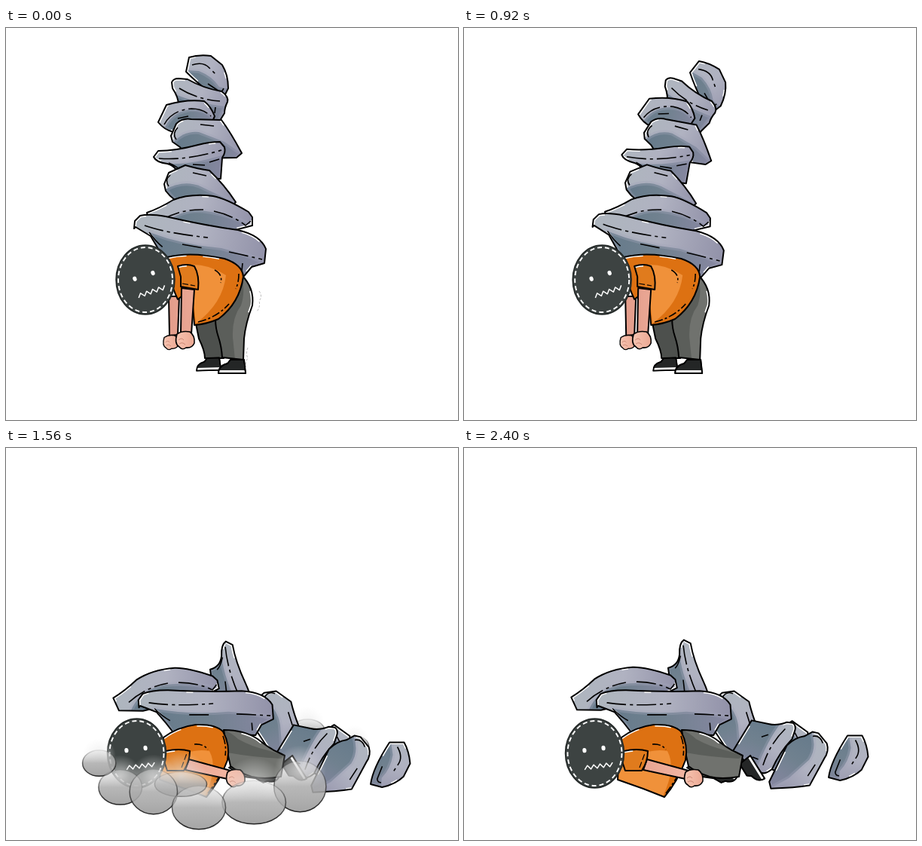
Animation of 600x520 px, one loop 2440 ms. Source, as an HTML page with a canvas:

```html
<!DOCTYPE html>
<html lang="en">
<head>
<meta charset="utf-8">
<title>Crushed by the load</title>
<style>
html, body { margin: 0; width: 100%; height: 100%; overflow: hidden; background: #fff; }
canvas { display: block; width: 600px; height: 520px; }
</style>
</head>
<body>
<canvas id="stage" width="600" height="520"></canvas>
<script>
const ctx = document.getElementById('stage').getContext('2d');
const LOOP = 2440, STEP = 40, TOPPLE = 1240, IMPACT = 1460;
const clamp = (v, lo = 0, hi = 1) => Math.min(hi, Math.max(lo, v));
const mix = (a, b, f) => a + (b - a) * f;
const span = (t, a, b) => clamp((t - a) / (b - a));
const rad = d => d * Math.PI / 180;

// Poses are [centre x, centre y, turn in degrees, scale].
// Outlines are drawn in the coordinates of the resting pose.
const rocks = [
  { rest: [267, 63, 0], left: [219, 65, -16], right: [323, 76, 26], fall: [387, 148, -15], down: [510, 410, 78], dip: 9, half: 44,
    edge: 'M239 58L243 39Q256 35 272 37L287 49Q295 62 295 80L288 94Q268 87 239 58Z',
    shade: 'M238 56L256 57Q274 64 283 78L295 81L288 96Q264 88 238 58Z',
    lines: 'M247 49Q262 44 270 53L279 62M268 74L283 84Q288 85 289 79' },
  { rest: [258, 91, 0], left: [221, 97, -8], right: [300, 97, 14], fall: [419, 240, 40], down: [409, 397, 104], dip: 6, half: 44,
    edge: 'M221 80L220 72Q222 67 229 67L241 68Q262 80 286 84Q296 91 294 98Q290 106 290 113L282 126L278 141L230 126L229 102Q229 92 221 80Z',
    shade: 'M225 88Q250 99 291 104L282 126L278 143L228 128Z',
    lines: 'M230 80Q254 95 284 97M243 100L248 108M278 105L277 113' },
  { rest: [239, 117, 0], left: [214, 124, -10], right: [269, 113, 10], fall: [411, 211, 44], down: [437, 400, 100], dip: 5, half: 44,
    edge: 'M202 125L213 102Q240 94 263 97Q272 104 277 117L274 124L268 147L236 148L222 138Q210 135 202 125Z',
    shade: 'M211 132Q222 109 248 108Q264 108 275 118L268 148L236 150Z',
    lines: 'M210 128Q220 109 246 107Q262 107 272 117M228 120L242 117' },
  { rest: [265, 146, 0], left: [249, 147, -6], right: [284, 149, 9], fall: [415, 298, 45], down: [447, 418, 117], dip: 5, half: 48,
    edge: 'M219 143L226 127Q234 119 246 121L286 122Q298 138 313 166L306 172L252 173Q238 168 231 158L221 151Z',
    shade: 'M222 152Q236 136 256 138L290 151L312 166L306 174L250 175Q234 168 222 152Z',
    lines: 'M226 148Q220 140 228 132M258 128L276 130' },
  { rest: [243, 172, 0], left: [233, 174, -5], right: [256, 174, 6], fall: [272, 204, 64, .86], down: [299, 301, 80], dip: 2, half: 46,
    edge: 'M196 171L202 163Q225 163 255 155Q270 151 284 151L290 158Q292 165 287 172L285 200L229 198Q228 184 214 180Q199 178 196 171Z',
    shade: 'M214 180Q246 182 289 168L285 201L229 199Q228 184 214 180Z',
    lines: 'M203 173Q240 176 286 162M216 179Q228 184 231 189M248 181L264 182M270 178L283 174' },
  { rest: [257, 206, 0], left: [253, 208, -3], right: [261, 206, 2], fall: [310, 268, 45], down: [367, 365, 60], dip: 0, half: 46,
    edge: 'M210 207L216 192L238 182Q255 187 270 189Q290 208 305 231L298 238L246 241Q222 230 212 216Z',
    shade: 'M212 214Q236 201 258 210L300 230L298 240L246 243Q222 230 212 214Z',
    lines: 'M216 210Q210 202 218 195M248 192L266 196' },
  { rest: [257, 246, 0], left: [257, 246, 0], right: [257, 246, 1], fall: [221, 260, 8], down: [211, 317, -12], dip: 1, half: 68,
    edge: 'M187 245Q204 239 222 228Q245 219 275 223Q292 226 322 244L327 251L327 262L304 268L222 270L191 263Z',
    shade: 'M206 267Q222 243 255 242Q290 244 326 262L304 270L222 272Z',
    lines: 'M206 255Q232 240 262 241M276 243Q300 248 318 262L325 256' },
  { rest: [256, 288, 0], left: [257, 288, -.7], right: [256, 288, 1.4], fall: [260, 307, 4], down: [265, 351, -10], dip: 0, half: 85,
    edge: 'M170 266L171 256L178 249Q190 246 212 250Q264 262 308 268Q338 275 345 293L343 312L326 317L316 329Q260 316 211 310Q202 292 192 276L172 264Z',
    shade: 'M190 271Q236 288 286 292Q326 302 343 311L326 318L316 331L209 311Q202 288 190 271Z',
    lines: 'M184 262Q212 272 268 278M190 271Q200 285 210 292M234 287L262 292M296 297Q324 303 340 307M314 312L313 322' }
];
for (const r of rocks)
  for (const key of ['edge', 'shade', 'lines']) r[key] = new Path2D(r[key]);

const swayTimes = [0, 200, 400, 600, 920, TOPPLE];

// Monotone cubic through the sway keys.
function spline(values, t) {
  const T = swayTimes;
  let i = 0;
  while (i < T.length - 2 && t > T[i + 1]) i++;
  const slope = k => (values[k + 1] - values[k]) / (T[k + 1] - T[k]);
  const tangent = k => {
    if (k === 0) return slope(0);
    if (k === T.length - 1) return slope(k - 1);
    const a = slope(k - 1), b = slope(k);
    return a * b <= 0 ? 0 : 2 * a * b / (a + b);
  };
  const h = T[i + 1] - T[i], u = (t - T[i]) / h, v = 1 - u;
  return (1 + 2 * u) * v * v * values[i] + u * v * v * h * tangent(i)
    + u * u * (3 - 2 * u) * values[i + 1] - u * u * v * h * tangent(i + 1);
}

function rockPose(r, t) {
  const keys = [r.rest, r.right, r.rest, r.left, r.right, r.fall];
  const value = (p, k) => p[k] ?? 1;
  return [0, 1, 2, 3].map(k => {
    if (t <= TOPPLE) return spline(keys.map(p => value(p, k)), t);
    const u = span(t, TOPPLE, IMPACT);
    const dip = k === 1 ? r.dip * u * (1 - span(t, 1560, 1720)) : 0;
    return mix(value(r.fall, k), value(r.down, k), u * (.6 + .4 * u)) + dip;
  });
}

function stroke(path, color = '#000', width = 2, dash = []) {
  ctx.strokeStyle = color;
  ctx.lineWidth = width;
  ctx.setLineDash(dash);
  ctx.stroke(path);
  ctx.setLineDash([]);
}

function fill(path, color) {
  ctx.fillStyle = color;
  ctx.fill(path);
}

function gradient(x0, y0, x1, y1, ...colors) {
  const g = ctx.createLinearGradient(x0, y0, x1, y1);
  colors.forEach((c, i) => g.addColorStop(i / (colors.length - 1), c));
  return g;
}

// Filled shape with broken white light just inside its black outline.
function inked(path, color, inner, dash = [16, 46, 7, 60]) {
  fill(path, color);
  ctx.save();
  ctx.clip(path);
  if (inner) inner();
  stroke(path, '#fff', 5, dash);
  ctx.restore();
  stroke(path);
}

function drawRock(r, t) {
  const [x, y, turn, scale] = rockPose(r, t);
  const [cx, cy] = r.rest;
  const w = r.half;
  ctx.save();
  ctx.translate(x, y);
  ctx.rotate(rad(turn));
  ctx.scale(scale, scale);
  ctx.translate(-cx, -cy);
  inked(r.edge, gradient(cx - w, cy - 20, cx + w, cy + 20, '#aeb6be', '#b0b2c1', '#9292a9'), () => {
    fill(r.shade, gradient(cx - w, cy, cx + w, cy + 10, '#64798a', '#70818f', '#8787a1'));
    ctx.globalAlpha = .35;
    stroke(r.shade, '#a2a4b8', 6);
    ctx.globalAlpha = 1;
  }, [28, 50, 9, 70]);
  stroke(r.lines, '#000', 1.6, [26, 5, 4, 5]);
  ctx.restore();
}

// Each part: standing, toppling, lying.
const man = {
  shirt: ['M214 304Q245 296 290 306Q314 314 315 330Q310 365 282 386Q266 393 250 394L246 346L228 360Q214 330 214 304Z',
    'M214 356Q228 331 272 333Q292 337 300 346Q302 368 288 400Q276 418 256 432L236 412L217 392Q212 372 214 356Z',
    'M209 384Q228 370 252 367Q278 366 288 376Q298 394 294 414Q284 442 266 463L238 452L204 440Q205 410 209 384Z'],
  glow: ['M228 316Q262 308 292 328Q288 365 252 392L247 346Z',
    'M216 372Q250 342 277 358Q276 395 256 431L218 392Z',
    'M206 425Q240 396 270 402Q282 424 264 462L205 440Z'],
  folds: ['M277 321Q288 327 285 338M309 326Q309 338 305 346M255 390Q280 384 296 366',
    'M266 356Q276 360 275 369M295 350Q297 364 293 376M260 426Q276 414 287 398',
    'M250 393Q262 392 268 400M288 382Q293 396 291 408M268 458Q280 442 290 424'],
  sleeve: ['M228 316Q240 312 250 316Q257 328 255 347L232 343L232 330Z',
    'M220 358Q238 354 254 364Q252 374 242 386L220 377L218 368Z',
    'M212 402Q230 398 244 402Q244 416 236 428L214 428L210 416Z'],
  cuff: ['M234 339L251 342', 'M238 381L249 366', 'M233 424L240 405'],
  arm: ['M233 345L250 347L246 406L232 404Z', 'M242 386L254 372L302 404L290 414Z', 'M238 427L243 413L298 428L294 439Z'],
  farArm: ['M216 356L230 356L228 407L217 408Z', 'M238 386L248 376L298 408L290 414Z', 'M234 426L240 416L298 430L294 437Z'],
  leg: ['M313 328Q330 345 327 368Q318 392 316 412L315 440L287 437Q286 422 282 410Q278 398 278 386L300 366Z',
    'M299 347Q324 350 336 368Q346 386 360 402L372 414L359 437Q338 432 328 424Q312 410 302 396L296 376Z',
    'M289 374Q316 374 334 386Q352 400 360 403L370 408L365 436Q342 440 326 436Q308 430 298 422L294 404Z'],
  legShade: ['M313 328Q318 350 312 368Q300 384 301 410L304 440L287 437Q284 410 277 386Z',
    'M299 347Q312 364 316 380Q330 402 344 418L366 428L359 437Q326 428 296 376Z',
    'M289 374Q300 378 308 386Q326 396 344 400L370 408L365 412Q326 410 294 404Z'],
  farLeg: ['M252 392L284 384Q286 400 287 415L289 438L264 438Q264 428 256 412Z',
    'M276 424L292 404Q304 420 310 426L328 430L320 442Q296 436 288 436Z',
    'M296 424L316 412Q330 426 338 428L352 432L346 440Q330 438 316 436Z']
};
const joints = {
  head: [[185, 334, -18], [179.5, 369.5, -14], [173.5, 405, -7]],
  hand: [[238, 414, 0], [302, 416, 0], [305, 438, 0]],
  farHand: [[219, 417, 0], [300, 413, 0], [304, 437, 0]],
  shoe: [[300, 449, 0], [371, 436, -76], [382, 428, -122]],
  farShoe: [[269, 446, -2], [327, 443, -80], [344, 436, -150]]
};
const handShape = new Path2D('M-11-8Q-4-13 6-11Q13-6 12 4Q9 11 1 10Q-4 14-8 9Q-15 5-11-8Z');
const knuckles = new Path2D('M-9 0Q-5-4-2 0M-8 5Q-4 2 0 6');
const shoeShape = new Path2D('M-18 9Q-18-1-6-4L-2-9L16-9L18 9Z');
const soleShape = new Path2D('M-18 5L18 5L18 9L-18 9Z');

function morph(poses, p) {
  const i = p < 1 ? 0 : 1, number = /-?[\d.]+/g;
  const next = poses[i + 1].match(number);
  let k = 0;
  return new Path2D(poses[i].replace(number, n => mix(+n, +next[k++], p - i).toFixed(2)));
}

function at(joint, p, draw, scale = 1) {
  const i = p < 1 ? 0 : 1;
  const [x, y, turn] = joint[i].map((v, k) => mix(v, joint[i + 1][k], p - i));
  ctx.save();
  ctx.translate(x, y);
  ctx.scale(scale, scale);
  draw(rad(turn));
  ctx.restore();
}

function drawShoe(turn) {
  ctx.rotate(turn);
  inked(shoeShape, '#242626', () => fill(soleShape, '#fff'), [0, 200]);
  stroke(shoeShape, '#000', 1.5);
}

function drawHand() {
  fill(handShape, gradient(-12, 0, 12, 0, '#f7c4b1', '#eba893'));
  stroke(handShape, '#000', 1.6);
  stroke(knuckles, '#c98573', 1);
}

function drawHead(turn) {
  const oval = new Path2D(), seam = new Path2D(), eyes = new Path2D(), mouth = new Path2D();
  oval.ellipse(0, 0, 39, 46, 0, 0, 7);
  seam.ellipse(0, 0, 36, 43, 0, 0, 7);
  fill(oval, '#3d4342');
  stroke(oval, '#222726', 1.5);
  stroke(seam, '#fff', 1.9, [6, 4]);
  ctx.rotate(turn);
  for (const x of [-13, 12.3]) {
    eyes.moveTo(x, -5.5);
    eyes.ellipse(x, -5.5, 2.6, 3.2, 0, 0, 7);
  }
  for (let i = 0; i < 10; i++) mouth.lineTo(-15.8 + i * 4.2, 17.5 + (i % 2 ? -2.6 : 2.6));
  fill(eyes, '#fff');
  stroke(mouth, '#fff', 1.5);
}

function drawMan(t) {
  const lean = span(t, 920, TOPPLE);
  const p = t <= TOPPLE ? lean * lean : 1 + span(t, TOPPLE, IMPACT);
  const part = name => morph(man[name], p);
  const plain = [0, 300];
  ctx.save();
  if (p === 0) ctx.translate(-1.8 * span(t, 0, 500), 0);

  const skin = gradient(215, 0, 300, 0, '#e39c8a', '#f4b7a3');
  inked(part('farArm'), skin, null, plain);
  inked(part('farLeg'), '#4d504d', null, plain);
  at(joints.farShoe, p, drawShoe, .9);
  at(joints.shoe, p, drawShoe);
  inked(part('leg'), '#70726e', () => fill(part('legShade'), '#5b5e5a'), [0, 24, 30, 300]);
  at(joints.farHand, p, drawHand, .82);
  inked(part('shirt'), '#dd7112', () => fill(part('glow'), '#f0913a'), [26, 22, 22, 300]);
  stroke(part('folds'), '#000', 1.6, [11, 3, 3, 3]);
  inked(part('arm'), skin, null, plain);
  at(joints.hand, p, drawHand);
  inked(part('sleeve'), '#e07b1d', null, [12, 300]);
  stroke(part('cuff'), '#000', 1.2, [8, 3]);
  at(joints.head, p, drawHead);
  ctx.restore();
}

const shiver = new Path2D('M336 349Q341 356 336 362Q338 370 333 376M321 424Q318 432 321 438Q317 444 319 450');
function drawShiver(t) {
  if (t > 800) return;
  ctx.globalAlpha = .3 + .25 * Math.sin(t / 600 * Math.PI / 2);
  stroke(shiver, '#222', 1, [3, 2]);
  ctx.globalAlpha = 1;
}

// Puffs: offset from the middle, height, radii.
const backPuffs = [[138, 376, 24, 17], [172, 420, 26, 20], [200, 396, 20, 15]];
const frontPuffs = [[-138, 418, 23, 18], [-110, 450, 30, 24], [-30, 446, 36, 17], [-66, 456, 33, 31],
  [128, 449, 36, 35], [67, 470, 44, 30], [-6, 477, 37, 30]];

function drawHaze(x, y, r) {
  const g = ctx.createRadialGradient(x, y, 0, x, y, r);
  g.addColorStop(0, 'rgba(235,235,235,.75)');
  g.addColorStop(1, 'rgba(235,235,235,0)');
  ctx.fillStyle = g;
  ctx.fillRect(x - r, y - r, 2 * r, 2 * r);
}

function drawSmoke(puffs, t) {
  if (t < 1420 || t >= 2000) return;
  const spread = 1 - (1 - span(t, 1420, 2020)) ** 3;
  const grown = mix(.55, 1.02, span(t, 1420, 1580));
  const placed = puffs.map(([dx, y, rx, ry]) => [262 + dx * (.42 + 1.06 * spread), y, rx * grown, ry * grown]);
  ctx.save();
  ctx.globalAlpha = span(t, 1400, 1480) * (1 - span(t, 1620, 2000));
  for (const [x, y, rx, ry] of placed) drawHaze(x, y - ry * .6, rx);
  for (const [x, y, rx, ry] of placed) {
    const puff = new Path2D();
    puff.ellipse(x, y, rx, ry, 0, 0, 7);
    fill(puff, gradient(0, y - ry, 0, y + ry, 'rgba(225,225,225,.4)', 'rgba(172,172,172,.85)', 'rgba(160,160,160,.95)'));
    stroke(puff, gradient(0, y - ry, 0, y + ry, 'rgba(60,60,60,.1)', 'rgba(40,40,40,.7)', '#222'), 1.5);
  }
  ctx.restore();
}

const stacked = [0, 1, 2, 3, 4, 5, 6, 7], scattered = [0, 2, 4, 5, 1, 3, 6, 7];

function frame() {
  const t = Math.floor(performance.now() % LOOP / STEP) * STEP;
  ctx.fillStyle = '#fff';
  ctx.fillRect(0, 0, 600, 520);
  ctx.lineJoin = 'round';
  drawSmoke(backPuffs, t);
  for (const i of t < 1160 ? stacked : scattered) drawRock(rocks[i], t);
  drawShiver(t);
  drawMan(t);
  drawSmoke(frontPuffs, t);
  requestAnimationFrame(frame);
}
frame();
</script>
</body>
</html>
```
